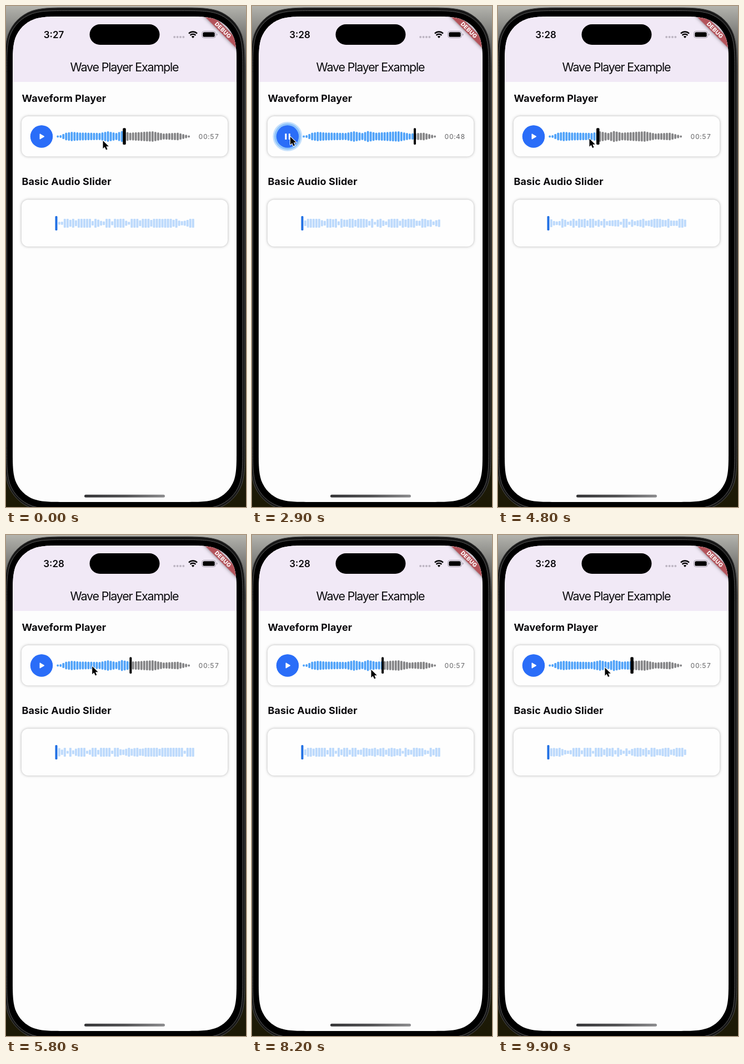
Animation of 432 by 904 pixels, one loop 10000 ms. Source, as an HTML page:

```html
<!DOCTYPE html>
<html lang="en">
<head>
<meta charset="utf-8">
<title>Wave Player Example</title>
<style>
  html, body { margin: 0; width: 100%; height: 100%; overflow: hidden; background: #000; }
  svg { display: block; width: 432px; height: 904px; }
  text { font-family: Inter, Roboto, "Liberation Sans", sans-serif; fill: #0b0a0d; }
  .title { font-size: 21.5px; letter-spacing: -1.2px; }
  .head { font-size: 18px; font-weight: 700; letter-spacing: .1px; }
  .clock { font-size: 17px; font-weight: 600; }
  .time { font-size: 12px; letter-spacing: .6px; fill: #626264; font-variant-numeric: tabular-nums; }
  .debug { font-size: 10.2px; font-weight: 800; letter-spacing: .3px; fill: #fff; }
  .card { fill: #fefefe; filter: drop-shadow(0 .5px 2.5px rgba(0, 0, 0, .3)); }
</style>
</head>
<body>
<svg viewBox="0 0 432 904">
  <defs>
    <linearGradient id="desk" x2="0" y2="1">
      <stop offset="0" stop-color="#b3b3ad"/>
      <stop offset=".04" stop-color="#8c8c88"/>
      <stop offset=".12" stop-color="#3b3c3c"/>
      <stop offset=".6" stop-color="#22211d"/>
      <stop offset="1" stop-color="#1c1905"/>
    </linearGradient>
    <linearGradient id="bar">
      <stop offset="0" stop-color="#343436"/>
      <stop offset=".5" stop-color="#505052"/>
      <stop offset="1" stop-color="#8c8c8e"/>
    </linearGradient>
    <clipPath id="clip"><path id="screen"/></clipPath>
  </defs>

  <rect width="432" height="904" fill="url(#desk)"/>
  <path id="shell" fill="#171717" stroke="#4c4c4c"/>
  <path id="bezel" stroke="#5a5a5a"/>

  <g clip-path="url(#clip)">
    <rect x="12" y="19" width="403" height="876" fill="#fdfdfd"/>
    <rect x="12" y="19" width="403" height="118" fill="#f1e9f6"/>
    <g transform="translate(415 19) rotate(45)">
      <rect x="-44" y="28.5" width="88" height="12" fill="#b4535a" style="filter:drop-shadow(0 0 3px rgba(0,0,0,.5))"/>
      <text class="debug" x="0" y="38.2" text-anchor="middle">DEBUG</text>
    </g>
  </g>

  <rect x="150.5" y="33" width="126" height="37" rx="18.5"/>
  <text id="clock" class="clock" x="86" y="57.5" text-anchor="middle"></text>
  <path d="M303.2 56H320" stroke="#bdb5c2" stroke-width="4" stroke-linecap="round" stroke-dasharray="0 5.4"/>
  <g fill="none" stroke="#000" stroke-width="2.4">
    <path d="M329 49.6A10.6 10.6 0 0 1 344 49.6M331.6 52.8A7 7 0 0 1 341.4 52.8"/>
    <path d="M336.5 58L333.8 55.3A4 4 0 0 1 339.2 55.3Z" fill="#000" stroke="none"/>
  </g>
  <rect x="352.5" y="45.5" width="25" height="12" rx="4" fill="none" stroke="#a49dab"/>
  <rect x="354.3" y="47.2" width="21.4" height="8.6" rx="2.6"/>
  <path d="M379 49.5q1.6 .6 1.6 2t-1.6 2z" fill="#a49dab"/>

  <text class="title" x="213" y="117.5" text-anchor="middle">Wave Player Example</text>
  <text class="head" x="28.5" y="172.5">Waveform Player</text>
  <text class="head" x="28.5" y="322.5">Basic Audio Slider</text>
  <rect class="card" x="28" y="199" width="371" height="72.5" rx="12"/>
  <rect class="card" x="28" y="349.5" width="371" height="84.5" rx="12"/>

  <g fill="#3f9af5">
    <circle id="halo" cx="64" cy="235.5" opacity=".3"/>
    <circle id="ring" cx="64" cy="235.5" opacity=".42"/>
  </g>
  <circle cx="64" cy="235.5" r="20.2" fill="#2a6df8"/>
  <path id="play" d="M61 230.8V240.2L69 235.5Z" fill="#fff" stroke="#fff" stroke-linejoin="round"/>
  <path id="pause" d="M59.4 230.3h3v10.6h-3zM65.9 230.3h3v10.6h-3z" fill="#fff"/>

  <g id="wave"></g>
  <rect id="knob" y="220.3" height="30" rx="1.8"/>
  <text id="time" class="time" x="346.5" y="239.8"></text>

  <g id="basic" fill="#bddafc"></g>
  <rect x="88.5" y="379" width="4" height="26" rx="1.5" fill="#2170e4"/>

  <rect x="141" y="881.8" width="145" height="5" rx="2.5" fill="url(#bar)"/>
  <path id="cursor" d="M0 0V14.2L3.2 11.2L5.6 16.6L8.1 15.5L5.8 10.3H10.4Z" stroke="#fff" stroke-width="2" stroke-linejoin="round" paint-order="stroke"/>
</svg>
<script>
const LOOP = 10000, STEP = 100, PITCH = 5.02, LEFT = 93.2;
const $ = id => document.getElementById(id);

// cursor stops: time, x, y
const STOPS = [
  [0, 174.5, 243], [900, 250, 236], [1200, 250, 235],
  [1600, 69, 236], [3500, 69, 236], [3900, 280, 240],
  [4800, 164.5, 239.5], [5500, 209, 239], [6300, 65.5, 233.5],
  [7900, 65.5, 233.5], [8200, 214.5, 243], [9000, 245, 241],
  [9500, 217, 240], [9900, 192.5, 239.5]
];
const DRAGS = [[-STEP, 900], [3900, 5500], [8200, 9000], [9500, LOOP]];
// from, to, playhead speed in px per second
const PLAYS = [[1700, 3500, 3.8], [6700, 7900, 9]];
// waveform outline: bar index, height
const OUTLINE = [
  [0, 4], [1, 5], [3, 14], [5, 17], [8, 14.5], [15, 13], [18, 19],
  [21, 13], [23, 20], [26, 14], [34, 19], [38, 11], [43, 14], [47, 4]
];

// linear interpolation through points [position, ...values]
function along(points, p) {
  const next = points.findIndex(q => q[0] > p);
  if (next < 1) return points.at(next).slice(1);
  const a = points[next - 1], b = points[next];
  const k = (p - a[0]) / (b[0] - a[0]);
  return a.slice(1).map((v, i) => v + (b[i + 1] - v) * k);
}

// rounded rectangle with continuous-curvature corners
function squircle(x, y, w, h, r) {
  const corner = (cx, cy, ux, uy, vx, vy) => {
    const at = (u, v) => `${cx + r * (u * ux + v * vx)} ${cy + r * (u * uy + v * vy)}`;
    return `L${at(1.53, 0)}C${at(1.09, 0)} ${at(.87, 0)} ${at(.63, .075)}`
      + `C${at(.37, .17)} ${at(.17, .37)} ${at(.075, .63)}`
      + `C${at(0, .87)} ${at(0, 1.09)} ${at(0, 1.53)}`;
  };
  const d = corner(x, y, 0, 1, 1, 0) + corner(x + w, y, -1, 0, 0, 1)
    + corner(x + w, y + h, 0, -1, -1, 0) + corner(x, y + h, 1, 0, 0, -1);
  return "M" + d.slice(1) + "Z";
}

function addBars(group, count, left, width, radius) {
  return Array.from({ length: count }, (_, i) => {
    const bar = document.createElementNS("http://www.w3.org/2000/svg", "rect");
    bar.setAttribute("x", left + i * PITCH - width / 2);
    bar.setAttribute("width", width);
    bar.setAttribute("rx", radius);
    group.append(bar);
    return bar;
  });
}

function setHeight(bar, mid, h) {
  bar.setAttribute("y", mid - h / 2);
  bar.setAttribute("height", h);
}

function random(seed) {
  return () => {
    seed = (seed + 0x6D2B79F5) | 0;
    let v = Math.imul(seed ^ (seed >>> 15), 1 | seed);
    v = (v + Math.imul(v ^ (v >>> 7), 61 | v)) ^ v;
    return ((v ^ (v >>> 14)) >>> 0) / 4294967296;
  };
}

// the playhead adds up every drag and every stretch of playback so far
function headAt(t) {
  let x = 213;
  for (const [from, to] of DRAGS)
    if (t > from) x += along(STOPS, Math.min(t, to))[0] - along(STOPS, from)[0];
  for (const [from, to, speed] of PLAYS)
    if (t > from) x += speed * (Math.min(t, to) - from) / 1000;
  return x;
}

$("shell").setAttribute("d", squircle(-2, 3, 432, 909, 77));
$("bezel").setAttribute("d", squircle(1.5, 8.5, 424.5, 899, 72));
$("screen").setAttribute("d", squircle(12, 19, 403, 876, 62));

const wave = addBars($("wave"), 48, LEFT, 3.8, 1.9);
wave.forEach((bar, i) => setHeight(bar, 235.4, along(OUTLINE, i)[0]));
const basic = addBars($("basic"), 49, 95.8, 4, 1);

function draw(t) {
  const [x, y] = along(STOPS, t);
  const head = headAt(t);
  const dragging = DRAGS.some(([from, to]) => t > from && t <= to);
  const span = PLAYS.find(([from, to]) => t >= from && t < to);
  const width = dragging ? 5.5 : 4;

  $("cursor").setAttribute("transform", `translate(${x} ${y})`);
  $("knob").setAttribute("x", head - width / 2);
  $("knob").setAttribute("width", width);
  wave.forEach((bar, i) => {
    bar.setAttribute("fill", LEFT + i * PITCH < head ? "#4fa2f9" : "#858587");
  });

  const pulse = span ? Math.sin(Math.PI * (t - span[0]) / 800) ** 2 : 0;
  $("halo").setAttribute("r", 20 + 6.5 * pulse);
  $("ring").setAttribute("r", 20 + 3.8 * pulse);
  $("play").style.display = span ? "none" : "";
  $("pause").style.display = span ? "" : "none";

  const seconds = span ? Math.floor((head - 92.5) / 238 * 57) : 57;
  $("time").textContent = "00:" + String(seconds).padStart(2, "0");
  $("clock").textContent = t < 700 ? "3:27" : "3:28";

  // the slider rolls new bars whenever the playhead moves
  const next = random(Math.round(head * 2) * 7919);
  basic.forEach(bar => setHeight(bar, 392, next() < .45 ? 16 : 5 + 11 * next()));
}

let last = -1;
function tick() {
  const t = Math.floor(performance.now() % LOOP / STEP) * STEP;
  if (t !== last) draw(last = t);
  requestAnimationFrame(tick);
}
tick();
</script>
</body>
</html>
```
